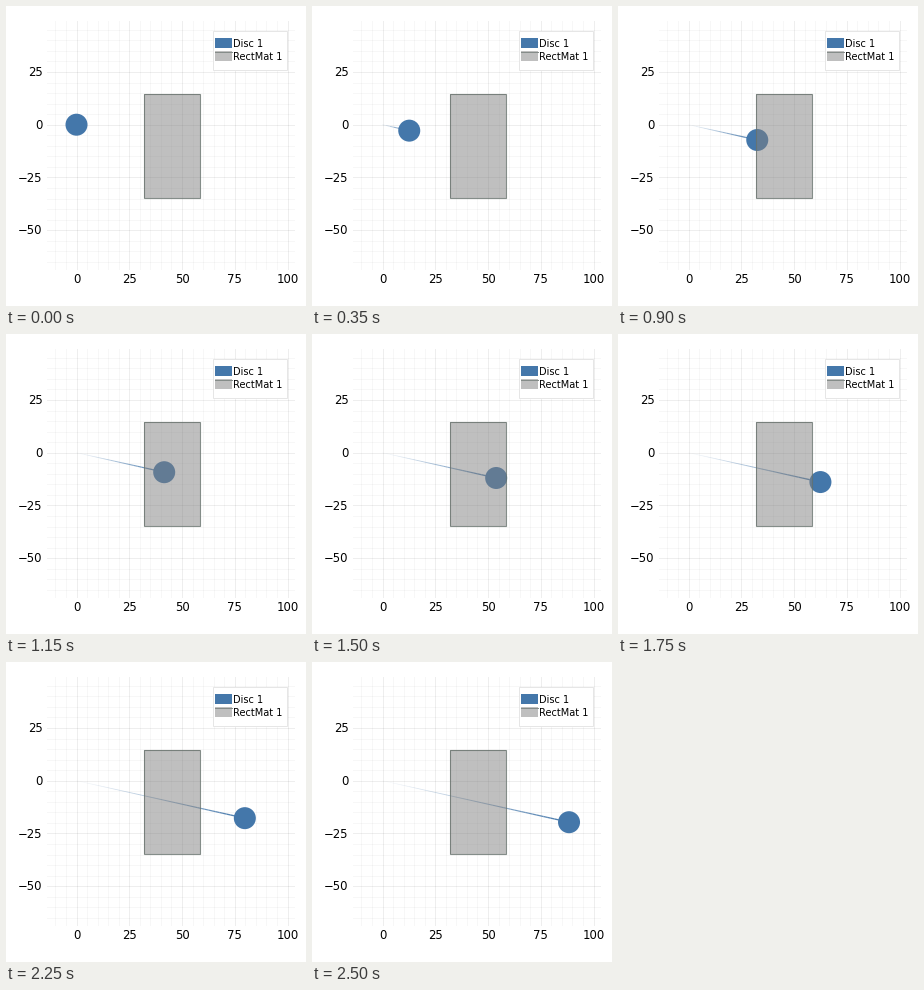
A matplotlib script for the animation above (2550 ms loop, 300 by 300 pixels).

```python
import numpy as np
import matplotlib.pyplot as plt
from matplotlib.animation import FuncAnimation
from matplotlib.collections import LineCollection
from matplotlib.colors import to_rgb
from matplotlib.patches import Circle, Rectangle

SIZE, DPI = 300, 100
PX = 72 / DPI                      # points per pixel
FRAMES, INTERVAL = 51, 50

BLUE, GREY, EDGE = "#4477aa", "#808080", "#66716c"
ORIGIN = np.array([70.5, 118.7])   # data (0, 0) in pixels
SCALE = 2.11                       # pixels per data unit
PLOT = (41, 288, 15, 263)          # left, right, top, bottom
MAT = (138, 194, 88, 192)
RADIUS = 11
SLOPE = 41.5 / 186.5
V_IN, V_OUT = 3.82, 3.64           # pixels per frame before and after the mat

plt.rcParams["font.family"] = "DejaVu Sans"
fig = plt.figure(figsize=(SIZE / DPI, SIZE / DPI), dpi=DPI, facecolor="white")
ax = fig.add_axes([0, 0, 1, 1])
ax.set(xlim=(0, SIZE), ylim=(SIZE, 0))
ax.axis("off")


def box(x0, x1, y0, y1, **style):
    ax.add_patch(Rectangle((x0, y0), x1 - x0, y1 - y0, **style))


def label(x, y, text, size, ha):
    ax.text(x, y, text, fontsize=size * PX, ha=ha, va="baseline",
            color="black", zorder=8)


def draw_grid():
    left, right, top, bottom = PLOT
    for value in range(-65, 105, 5):
        alpha = 0.065 if value % 25 == 0 else 0.03
        style = dict(color="black", alpha=alpha, lw=PX, zorder=1)
        x = ORIGIN[0] + value * SCALE
        y = ORIGIN[1] - value * SCALE
        if left < x < right:
            ax.plot([x, x], [top, bottom], **style)
        if top < y < bottom:
            ax.plot([left, right], [y, y], **style)


def draw_ticks():
    for value in range(0, 101, 25):
        label(ORIGIN[0] + value * SCALE, 277.3, str(value), 11.6, "center")
    for value in range(-50, 26, 25):
        text = str(value).replace("-", "\u2212")
        label(36.7, ORIGIN[1] - value * SCALE + 4.2, text, 11.6, "right")


def draw_legend():
    box(206.5, 280.5, 24.5, 63.5, fc="white", ec="#e6e6e6", lw=PX, zorder=6)
    box(209, 226, 32, 42, fc=BLUE, lw=0, zorder=7)
    box(209, 226, 45, 55, fc="#bfbfbf", lw=0, zorder=7)
    ax.plot([209, 226], [45.5, 45.5], color="#858c89", lw=PX, zorder=7)
    label(227, 41, "Disc 1", 9.8, "left")
    label(227, 54, "RectMat 1", 9.8, "left")


def position(t):
    """Disc centre: steady, slowed by friction on the mat, steady again."""
    t = np.asarray(t, dtype=float)
    t_in = (MAT[0] - ORIGIN[0]) / V_IN
    span = 2 * (MAT[1] - MAT[0]) / (V_IN + V_OUT)
    on_mat = np.clip(t - t_in, 0, span)
    drag = (V_IN - V_OUT) / span
    dx = (V_IN * np.minimum(t, t_in)
          + V_IN * on_mat - drag * on_mat ** 2 / 2
          + V_OUT * np.maximum(t - t_in - span, 0))
    return np.stack([ORIGIN[0] + dx, ORIGIN[1] + SLOPE * dx], axis=-1)


draw_grid()
draw_ticks()
draw_legend()
box(*MAT, fc=GREY, alpha=0.5, lw=0, zorder=4)
box(*MAT, fc="none", ec=EDGE, alpha=0.8, lw=1.1 * PX, zorder=5)

trail = LineCollection([], zorder=2, capstyle="butt")
ax.add_collection(trail, autolim=False)
disc = Circle(ORIGIN, RADIUS, fc=BLUE, lw=0, zorder=3)
ax.add_patch(disc)


def update(frame):
    path = position(np.arange(frame + 1))
    fade = np.arange(1, frame + 1) / max(frame, 1)
    trail.set_segments(list(zip(path[:-1], path[1:])))
    trail.set_color([(*to_rgb(BLUE), a) for a in fade])
    trail.set_linewidth((0.5 + 0.9 * fade) * PX if frame else [0])
    disc.center = tuple(path[-1])
    return trail, disc


anim = FuncAnimation(fig, update, frames=FRAMES, interval=INTERVAL,
                     repeat=True, repeat_delay=0)
plt.show()
```
